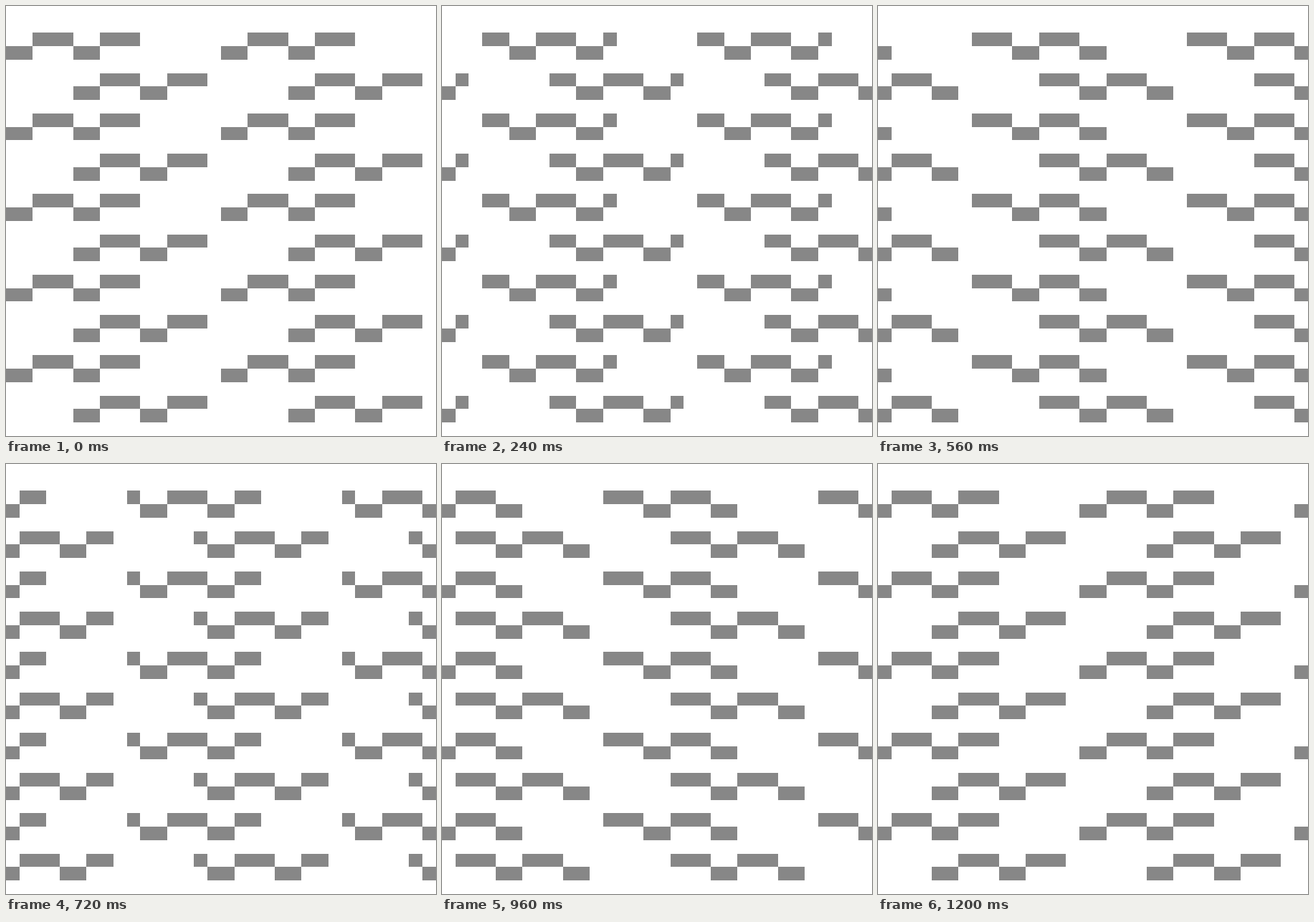
Write an HTML page with a canvas that moves like this. It is 600 px wide and 600 px high and loops after 1280 ms.

```html
<!DOCTYPE html>
<html lang="en">
<head>
<meta charset="utf-8">
<title>Waves</title>
<style>
  html, body { margin: 0; height: 100%; overflow: hidden; background: #fff; }
  canvas { display: block; }
</style>
</head>
<body>
<canvas width="600" height="600"></canvas>
<script>
const ctx = document.querySelector('canvas').getContext('2d');
const STEP = 80, PERIOD = 16, LENGTH = 10;

// Grid line to whole pixel, halves rounded down
const px = n => Math.ceil(n * 18.75 - 0.5);

function cell(x, y) {
  ctx.fillRect(px(x), px(y), px(x + 1) - px(x), px(y + 1) - px(y));
}

// A window of LENGTH cells slides over a fixed wave: two cells low, three high
function wave(start, row) {
  for (let x = start; x < start + LENGTH; x++) {
    const y = row + (x % 5 < 2 ? 1 : 0);
    for (let copy = -2; copy <= 1; copy++) cell(x + copy * PERIOD, y);
  }
}

function draw(time) {
  const step = Math.floor(time / STEP) % PERIOD;
  ctx.fillStyle = '#fff';
  ctx.fillRect(0, 0, 600, 600);
  ctx.fillStyle = '#878787';
  for (let i = 0; i < 10; i++) wave(step + (i % 2) * 5, 2 + i * 3);
}

let begin;
function tick(now) {
  begin ??= now;
  draw(now - begin);
  requestAnimationFrame(tick);
}
draw(0);
requestAnimationFrame(tick);
</script>
</body>
</html>
```
